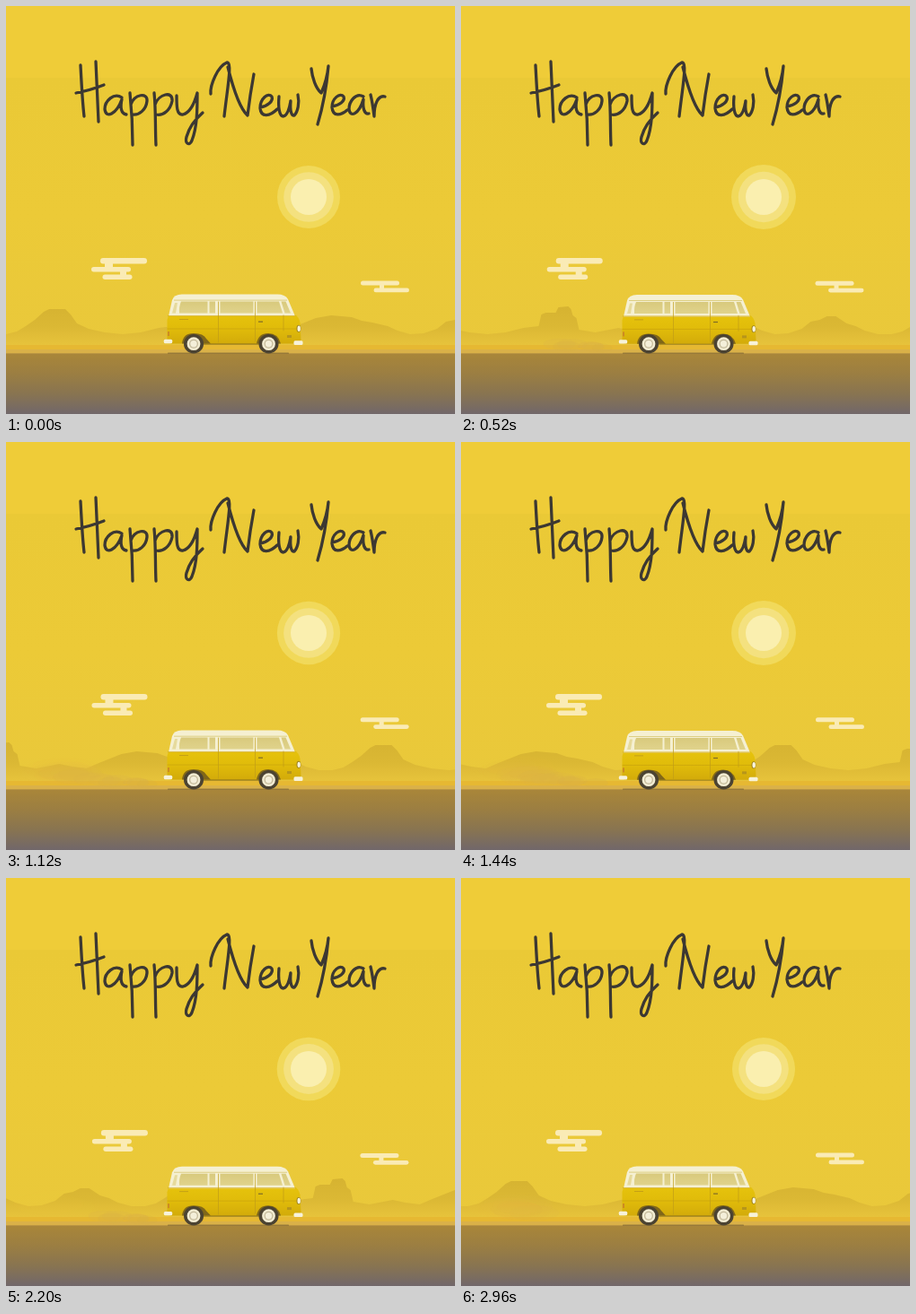
Write an HTML page with a canvas that moves like this. It is 500 px wide and 455 px high and loops after 3000 ms.

```html
<!DOCTYPE html>
<html lang="en">
<head>
<meta charset="utf-8">
<title>Happy New Year</title>
<style>
html, body { margin: 0; width: 100%; height: 100%; overflow: hidden; background: #efcc38; }
canvas { display: block; }
</style>
</head>
<body>
<canvas id="stage" width="500" height="455" role="img" aria-label="Happy New Year"></canvas>
<script>
const ctx = document.getElementById('stage').getContext('2d');
const W = 500, H = 455, LOOP = 3000, STEP = 40, SPAN = 580, ROAD = 388;
const CREAM = '#faebb5';

// One repeating stretch of desert skyline
const ridge = [
  [0, 366], [12, 363], [22, 357], [32, 350], [42, 341], [48, 338], [66, 338], [72, 344], [79, 354],
  [92, 360], [110, 364], [130, 366], [150, 364], [170, 359], [187, 357], [190, 344], [195, 342],
  [206, 342], [209, 336], [220, 335], [223, 338], [225, 345], [229, 348], [232, 361], [250, 364],
  [276, 359], [290, 362], [306, 364], [320, 358], [330, 354], [345, 348], [362, 345], [385, 347],
  [396, 351], [408, 353], [425, 357], [436, 362], [450, 366], [465, 365], [480, 360], [490, 352],
  [500, 350], [508, 346], [518, 346], [530, 354], [540, 357], [550, 362], [565, 366]
];

// Hand lettering, one path per word
const words = [
  'M83 66C84 85 85 106 87 123M100 62C101 84 102 107 103 129M78 97C88 95 99 92 109 88' +
  'M129 102C120 96 110 106 110 115C111 126 123 121 129 104C127 113 128 120 134 121' +
  'M138 97C140 116 141 136 141 155M139 110C143 98 158 96 157 106C156 116 148 122 141 121' +
  'M165 97C167 116 166 136 167 155M166 110C170 98 186 94 185 106C183 116 175 123 167 121' +
  'M190 100C190 112 190 122 197 121C205 119 210 108 213 97C213 115 213 135 207 150C204 157 199 153 201 146C204 135 211 126 219 119',
  'M228 98C227 88 236 67 246 63C252 63 247 88 243 123M247 68C253 92 260 114 269 122C271 105 273 92 276 76' +
  'M283 113C291 112 298 106 296 101C292 96 283 103 283 114C284 125 294 123 302 115' +
  'M304 101C303 112 304 123 309 123C314 122 316 112 317 106C316 117 318 123 321 122C325 118 327 108 325 99',
  'M340 70C341 80 345 92 351 97C355 88 358 78 359 67C357 90 353 112 347 132' +
  'M363 112C371 111 378 106 376 101C372 96 363 103 363 113C364 124 373 122 380 116' +
  'M398 101C390 96 382 106 382 115C383 125 393 121 398 104C397 114 399 121 404 120' +
  'M406 99C408 107 409 115 410 123C410 110 414 99 422 101'
].map(d => new Path2D(d));

function fade(y0, y1, ...colors) {
  const g = ctx.createLinearGradient(0, y0, 0, y1);
  colors.forEach((c, i) => g.addColorStop(i / (colors.length - 1), c));
  return g;
}

function rect(x, y, w, h, fill) {
  ctx.fillStyle = fill;
  ctx.fillRect(x, y, w, h);
}

function pill(x, y, w, h, fill, r = h / 2) {
  ctx.fillStyle = fill;
  ctx.beginPath();
  ctx.roundRect(x, y, w, h, r);
  ctx.fill();
}

function oval(x, y, rx, ry, fill) {
  ctx.fillStyle = fill;
  ctx.beginPath();
  ctx.ellipse(x, y, rx, ry, 0, 0, Math.PI * 2);
  ctx.fill();
}

function shape(d, fill) {
  ctx.fillStyle = fill;
  ctx.fill(new Path2D(d));
}

function line(d, color, width) {
  ctx.strokeStyle = color;
  ctx.lineWidth = width;
  ctx.stroke(new Path2D(d));
}

const wave = (t, period) => (1 - Math.cos(t / period * Math.PI * 2)) / 2;

function drawSky(t) {
  rect(0, 0, W, 80, '#efcc38');
  rect(0, 80, W, ROAD - 80, fade(80, ROAD, '#eac936', '#ecca37', '#e9c83b'));
  const grow = wave(t, 1000);
  oval(337, 213, 35 + grow, 35 + grow, '#f1d95a');
  oval(337, 213, 27.8 + grow * .4, 27.8 + grow * .4, '#f4e17f');
  oval(337, 213, 20, 20, '#faefaf');
}

function drawClouds(t) {
  const drift = wave(t, 1500);
  ctx.save();
  ctx.translate(drift * .9, 0);
  pill(105, 281, 52, 6.5, CREAM);
  pill(95, 291, 44, 5.5, CREAM);
  pill(107.5, 299.5, 33, 5.5, CREAM);
  rect(110, 286, 9, 6, CREAM);
  rect(127, 295, 7, 6, CREAM);
  ctx.restore();
  ctx.save();
  ctx.translate(-drift * .6, .8 * wave(t, LOOP));
  pill(395, 306.5, 43, 5, CREAM);
  pill(409.5, 314.5, 39.5, 4.8, CREAM);
  rect(416, 310, 5, 6, CREAM);
  ctx.restore();
}

function drawHills(t) {
  const shift = t / LOOP * SPAN;
  ctx.beginPath();
  ctx.moveTo(-SPAN, ROAD);
  for (let k = 0; k < 3; k++) {
    for (const [x, y] of ridge) ctx.lineTo(x + k * SPAN - shift, y);
  }
  ctx.lineTo(3 * SPAN, ROAD);
  ctx.closePath();
  ctx.fillStyle = fade(335, 380, '#d6b331', '#dbb834', '#e8c43c');
  ctx.fill();
  rect(0, 378, W, 5, '#e6b832');
  rect(0, 383, W, 5, '#dab148');
}

// Puffs thrown up by the rear wheel, slowing and thinning as they drift back
function drawDust(t) {
  ctx.save();
  ctx.beginPath();
  ctx.rect(0, 300, W, 90);
  ctx.clip();
  for (const start of [270, 870, 1950]) {
    for (let i = 0; i < 12; i++) {
      const age = t - start - i * 42, life = age / 1050;
      if (life <= 0 || life >= 1) continue;
      const x = 176 - 130 * (1 - Math.exp(-age / 350)) + 9 * Math.sin(i * 2.4);
      const y = 382 - 21 * life + 5 * Math.sin(i * 4.1) * life;
      const alpha = .36 * (1 - life) ** 1.4 * Math.min(1, age / 60);
      oval(x, y, 10 + 34 * life, 4.5 + 8 * life, `rgba(217,177,68,${alpha})`);
    }
  }
  ctx.restore();
}

function drawRoad() {
  rect(0, ROAD, W, H - ROAD, fade(ROAD, H, '#a98639', '#9b7e42', '#887451', '#71676a'));
  rect(0, 387.4, W, 1, '#a78540');
}

function drawWheel(x) {
  oval(x, 376.7, 11, 10.8, '#4b4332');
  oval(x, 376.7, 7.4, 7.4, '#f2ecd2');
  oval(x, 376.7, 5, 5, '#c4ba9a');
  oval(x, 376.7, 3.7, 3.7, '#f4efd9');
}

function drawVan(t) {
  pill(180, 386.6, 135, 1.2, 'rgba(80,64,40,.45)');
  rect(218, 374, 66, 3.6, '#8a6f1a');
  ctx.save();
  ctx.translate(0, .4 * wave(t, 1000));
  shape('M181 345L179.5 350V372Q180 376.4 184 376.4H322Q328 376.4 328.5 372L327.5 353Q326 346 321 344Z',
    fade(344, 377, '#e6c30c', '#e0bb0a', '#d2aa0a'));
  shape('M181 346L185 328Q187 321.5 196 321.5H302Q311 321.5 314 327L322 346Z', '#f5f0d2');
  rect(187, 327.6, 126, 1, '#ddce83');
  const glass = fade(329, 343, '#d8c97c', '#e0d38c');
  shape('M188 331H191L189 342.5H185Z', '#e6da9c');
  shape('M195 329.5H224.5V342.5H193Q192.5 335 195 329.5Z', glass);
  shape('M226.5 329.5H233V342.5H226.5Z', glass);
  shape('M238.5 329.5H275.5V342.5H238.5Z', glass);
  shape('M279.5 329.5H304L308 342.5H279.5Z', glass);
  shape('M306.5 329.5H311.5L317 342.5H310.5Z', glass);
  line('M180.5 345.6H322', '#d2aa16', .8);
  line('M180 360H327', '#cba50d', .8);
  line('M236.5 330V375M277.5 330V374M309 345V362', '#c19c18', .7);
  rect(281, 351.5, 5, 1.2, '#7f6c27');
  rect(193, 349, 10, 1, '#c5a016');
  rect(180, 363, 2, 5, '#cd8a22');
  rect(313, 367, 5, 3, '#b6951b');
  oval(325.9, 359.8, 2.4, 4, '#9b8120');
  oval(326.2, 359.8, 1.7, 3.2, '#faf5dd');
  shape('M196 376.4Q197 365 209 365Q220 365 223 371L228 376.4Z', '#806719');
  shape('M279 376.4Q281 365 292 365Q303 365 306 376.4Z', '#806719');
  pill(175.8, 371.8, 9.4, 4.4, '#f7f2d9', 1.5);
  pill(320.5, 373.3, 10, 4.6, '#f7f2d9', 1.5);
  ctx.restore();
  drawWheel(209);
  drawWheel(292.5);
}

function drawLettering() {
  ctx.strokeStyle = '#3c3832';
  ctx.lineWidth = 3.3;
  ctx.lineCap = ctx.lineJoin = 'round';
  words.forEach(word => ctx.stroke(word));
}

function draw(t) {
  drawSky(t);
  drawClouds(t);
  drawHills(t);
  drawRoad();
  drawDust(t);
  drawVan(t);
  drawLettering();
}

const begin = performance.now();
function tick() {
  const t = (performance.now() - begin) % LOOP;
  draw(Math.floor(t / STEP) * STEP);
  requestAnimationFrame(tick);
}
tick();
</script>
</body>
</html>
```
